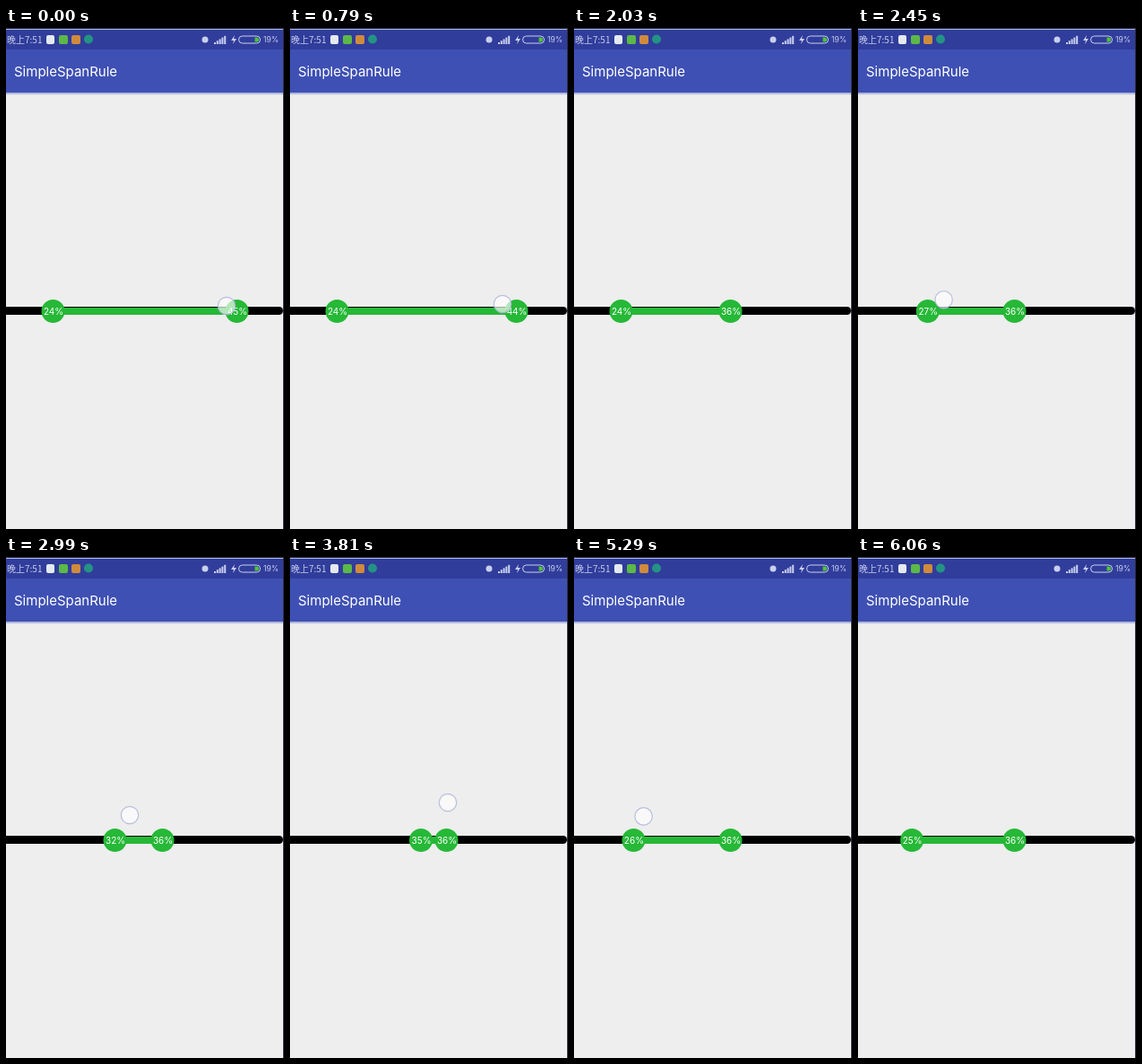
An HTML page with a canvas for the animation above (6930 ms loop, 310x559 px).

```html
<!DOCTYPE html>
<html lang="zh">
<head>
<meta charset="utf-8">
<title>Range slider</title>
<style>
  html, body { margin: 0; width: 100%; height: 100%; overflow: hidden; background: #edeeed; }
  canvas { position: absolute; left: 0; top: 0; width: 310px; height: 559px; }
  span { position: absolute; white-space: nowrap; }
  .title { left: 9px; top: 41px; font: 15px/1 Inter, sans-serif; color: #fff; }
  .clock { left: 1px; top: 8px; font: 10px/1 "Noto Sans CJK SC", "Noto Sans CJK", sans-serif; color: #c9cfee; }
  .charge { left: 287px; top: 9px; font: 8.5px/1 Inter, sans-serif; color: #c9cfee; }
</style>
</head>
<body>
<canvas id="stage"></canvas>
<span class="clock">晚上7:51</span>
<span class="charge">19%</span>
<span class="title">SimpleSpanRule</span>
<script>
const W = 310, H = 559, LOOP = 6930;
const STEP = 136.5, PHASE = 30;      // the screen refreshes in even steps
const GREEN = '#26b837', PALE = '#c9cfee', EDGE = '#2b2535';
const TRACK_Y = 316, GAP = 28.5;     // GAP: closest the thumbs can get

const linear = p => p;
const easeIn = p => p * p;
const easeOut = p => 1 - (1 - p) ** 2;

// Finger paths: [step, x, y, easing towards this point]
const DRAG_HIGH = [[0, 246, 310], [4, 266, 307], [6, 237, 308, easeIn], [14, 159, 310, easeOut]];
const DRAG_LOW = [[16, 30, 309], [17, 85, 307], [22, 138, 288], [26, 176, 274, easeOut],
  [29, 176, 274], [34, 104, 283], [39, 71, 291]];

const canvas = document.getElementById('stage');
const ctx = canvas.getContext('2d');
const dpr = window.devicePixelRatio || 1;
canvas.width = W * dpr;
canvas.height = H * dpr;
ctx.scale(dpr, dpr);

const clamp = (v, min, max) => Math.min(max, Math.max(min, v));

function along(path, n) {
  n = clamp(n, path[0][0], path.at(-1)[0]);
  const k = Math.max(1, path.findIndex(key => n <= key[0]));
  const [n0, x0, y0] = path[k - 1];
  const [n1, x1, y1, ease = linear] = path[k];
  const p = ease((n - n0) / (n1 - n0));
  return { x: x0 + (x1 - x0) * p, y: y0 + (y1 - y0) * p };
}

function rect(x, y, w, h, color) {
  ctx.fillStyle = color;
  ctx.fillRect(x, y, w, h);
}

function round(x, y, w, h, r, color) {
  ctx.beginPath();
  ctx.roundRect(x, y, w, h, r);
  ctx.fillStyle = color;
  ctx.fill();
}

function disc(x, y, r, color) {
  round(x - r, y - r, 2 * r, 2 * r, r, color);
}

function outline(color, width) {
  ctx.strokeStyle = color;
  ctx.lineWidth = width;
  ctx.stroke();
}

function statusIcons() {
  round(45, 8, 9, 10, 2, '#e4eaf0');
  round(59, 8, 10, 10, 2, '#5cb947');
  round(73, 8, 10, 10, 2, '#d08a3c');
  disc(92, 12.5, 5, '#249384');
  disc(222, 13, 3.5, PALE);
  for (let i = 0; i < 5; i++) rect(232 + i * 2.8, 16 - i * 1.8, 2, 2 + i * 1.8, PALE);

  ctx.fillStyle = PALE;
  ctx.fill(new Path2D('M255 8L251 14H254L253 18L257 12H254Z'));

  ctx.beginPath();
  ctx.roundRect(259.5, 9, 24, 8, 4);
  outline(PALE, 1);
  round(277.5, 10.5, 4.5, 5, [0, 2.5, 2.5, 0], '#4fc334');
}

function chrome() {
  rect(0, 0, W, H, '#edeeed');
  rect(0, 0, W, 24, '#303d9b');
  rect(0, 0, W, 1, EDGE);
  rect(0, 1, W, 1, '#a9bdf0');
  rect(0, 24, W, 48, '#3e50b3');
  ['#a4add8', '#b9c0e0', '#e3e5ea'].forEach((c, i) => rect(0, 72 + i, W, 1, c));
  statusIcons();
}

function thumb(x, percent) {
  disc(x + 0.5, TRACK_Y, 13, GREEN);
  ctx.fillStyle = '#fff';
  ctx.font = '10px Inter, sans-serif';
  ctx.textAlign = 'center';
  ctx.fillText(Math.floor(percent) + '%', x + 1, TRACK_Y + 3.5);
}

function finger({ x, y }) {
  disc(x, y, 9.7, 'rgba(255,255,255,.65)');
  outline('rgba(176,180,220,.85)', 1.2);
}

function draw(time) {
  const n = Math.floor((time + PHASE) / STEP);
  const right = along(DRAG_HIGH, n), left = along(DRAG_LOW, n);

  // Each thumb follows its finger at a slowly changing distance.
  const high = right.x + Math.min(15, 11 + n * 2 / 3);
  const lead = 17 - (Math.min(n, 39) - 22) / 3;
  const low = clamp(left.x - lead, 52, high - GAP);

  chrome();
  round(-10, 311, 319, 9, 4.5, '#000');
  rect(W - 1, 0, 1, H, EDGE);
  rect(low, 312, high - low, 8, GREEN);
  thumb(low, 24.7 + (low - 52) / 8.9);
  thumb(high, 36.1 + (high - 174) / 8.9);

  if (n < 15) finger(right);
  else if (n > 15 && n < 40) finger(left);
}

const start = performance.now();
function loop() {
  draw((performance.now() - start) % LOOP);
  requestAnimationFrame(loop);
}
loop();
</script>
</body>
</html>
```
